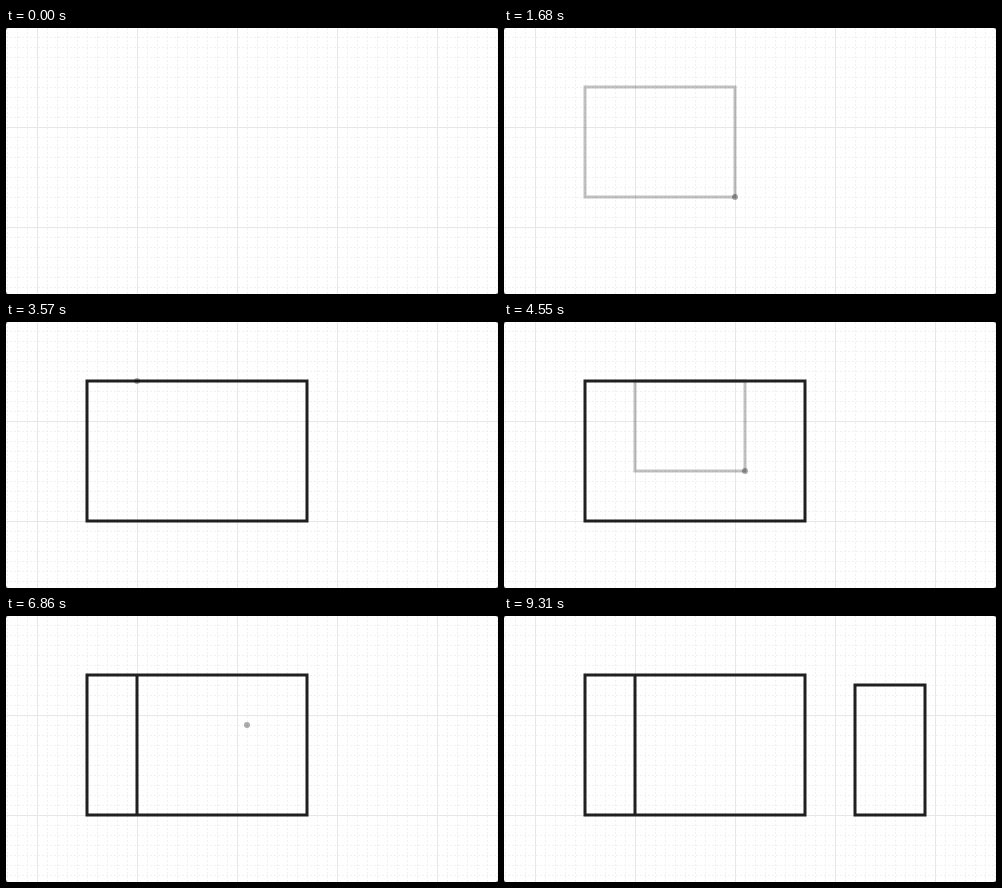
Write an HTML page with a canvas that moves like this. It is 492 by 266 pixels and loops after 9.38 s.

```html
<!DOCTYPE html>
<html lang="en">
<head>
<meta charset="utf-8">
<title>Drawing rectangles on a grid</title>
<style>
  html, body { margin: 0; width: 100%; height: 100%; overflow: hidden; background: #fff; }
  canvas { display: block; }
</style>
</head>
<body>
<canvas id="stage" width="492" height="266"></canvas>
<script>
const W = 492, H = 266, CELL = 10;
const TICK = 70, LOOP = 134, SHOW = 2, HIDE = 133;
const ctx = document.getElementById('stage').getContext('2d');

// The pointer glides between grid cells; times are in ticks
const glide = (at, steps, col, row) => ({ at, steps, col, row });
const START = { col: 22, row: 25 };
const GLIDES = [
  glide(10, 7, 8, 5),
  glide(20, 5, 23, 16),
  glide(25, 4, 30, 19),
  glide(39, 5, 34, 9),
  glide(45, 7, 13, 5),
  glide(63, 17, 30, 19),
  glide(90, 3, 19, 11),
  glide(98, 7, 35, 6),
  glide(109, 7, 42, 19),
  glide(127, 5, 27, 25)
];

// Each drag draws a rectangle between the press and release positions
const DRAGS = [
  { press: 20, release: 36 },
  { press: 63, release: 86 },
  { press: 109, release: 122 }
];

// Longer glides slow down more towards their end
const easeOut = (s, steps) => 1 - (1 - s) ** (steps / 2.8);

function pointerAt(tick) {
  let { col, row } = START;
  for (const g of GLIDES) {
    if (tick < g.at) break;
    const p = easeOut(Math.min(1, (tick - g.at + 1) / g.steps), g.steps);
    col += Math.trunc((g.col - col) * p);
    row += Math.trunc((g.row - row) * p);
  }
  return { x: col * CELL + 1, y: row * CELL + 9 };
}

function line(c, x1, y1, x2, y2, major) {
  c.strokeStyle = major ? '#e7e7e7' : '#f0f0f0';
  c.setLineDash(major ? [] : [2, 2]);
  c.beginPath();
  c.moveTo(x1, y1);
  c.lineTo(x2, y2);
  c.stroke();
}

function makeGrid() {
  const grid = document.createElement('canvas');
  grid.width = W;
  grid.height = H;
  const c = grid.getContext('2d');
  c.fillStyle = '#555';
  c.fillRect(0, 0, W, H);
  c.beginPath();
  c.roundRect(0, 0, W, H, 3);
  c.clip();
  c.fillStyle = '#fff';
  c.fillRect(0, 0, W, H);
  for (const major of [false, true]) {
    for (let x = 1; x < W; x += CELL) {
      if ((x % 100 === 31) === major) line(c, x + .5, 0, x + .5, H, major);
    }
    for (let y = 9; y < H; y += CELL) {
      if ((y % 100 === 99) === major) line(c, 0, y + .5, W, y + .5, major);
    }
  }
  return grid;
}

const grid = makeGrid();

// Strokes all boxes as one path, so shared edges are painted once
function strokeBoxes(drags, tick, color) {
  ctx.beginPath();
  for (const d of drags) {
    const a = pointerAt(d.press - 1);
    const b = pointerAt(Math.min(tick, d.release));
    ctx.rect(a.x, a.y, b.x - a.x, b.y - a.y);
  }
  ctx.strokeStyle = color;
  ctx.lineWidth = 3;
  ctx.stroke();
}

function draw(tick) {
  ctx.drawImage(grid, 0, 0);
  const active = DRAGS.filter(d => tick >= d.press && tick < d.release);
  const done = DRAGS.filter(d => tick >= d.release);
  strokeBoxes(active, tick, 'rgba(32, 32, 32, .28)');
  strokeBoxes(done, tick, '#202020');
  if (tick >= SHOW && tick < HIDE) {
    const { x, y } = pointerAt(tick);
    ctx.fillStyle = 'rgba(0, 0, 0, .33)';
    ctx.beginPath();
    ctx.arc(x, y, 3, 0, Math.PI * 2);
    ctx.fill();
  }
}

const begin = performance.now();
function frame() {
  draw(Math.floor((performance.now() - begin) / TICK) % LOOP);
  requestAnimationFrame(frame);
}
frame();
</script>
</body>
</html>
```
